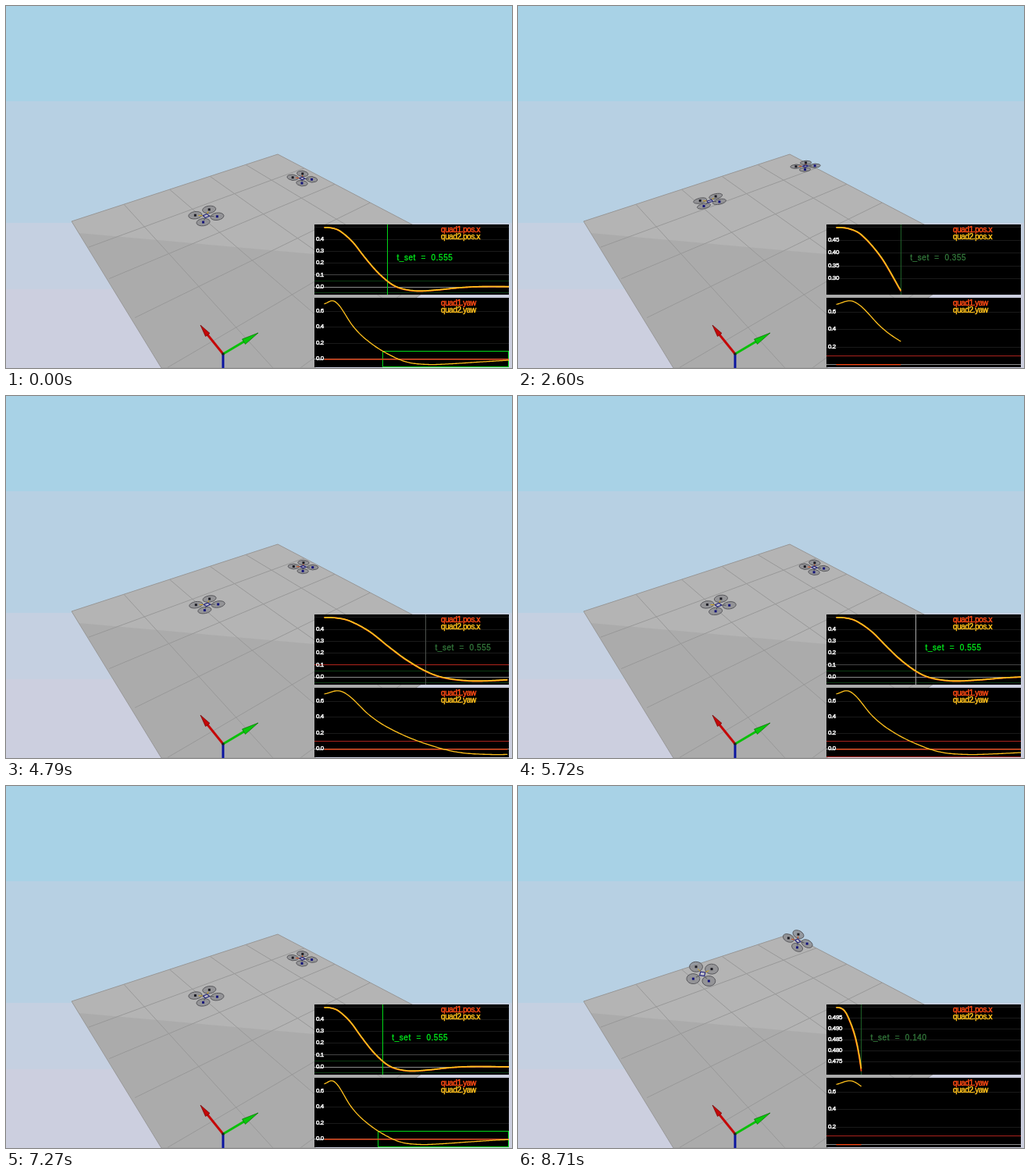
Write an HTML page with a canvas that moves like this. It is 648 by 464 pixels and loops after 8.81 s.

```html
<!DOCTYPE html>
<html lang="en">
<head>
<meta charset="utf-8">
<title>Quadrotor step response</title>
<style>
  html, body { margin: 0; width: 648px; height: 464px; overflow: hidden; }
  svg, canvas { position: absolute; left: 0; top: 0; display: block; }
</style>
</head>
<body>
<svg width="648" height="464" viewBox="0 0 648 464">
  <defs>
    <clipPath id="floorClip"><path id="floor" d="M84 276 348 190 600 322 395 464H199Z"/></clipPath>
  </defs>
  <path fill="#a8d2e6" d="M0 0H648V122H0Z"/>
  <path fill="#b7d0e3" d="M0 122H648V278H0Z"/>
  <path fill="#c5d0e1" d="M0 278H648V363H0Z"/>
  <path fill="#cccfdf" d="M0 363H648V464H0Z"/>
  <g clip-path="url(#floorClip)">
    <path fill="#ababab" d="M0 180H648V464H0Z"/>
    <path fill="#b4b4b4" d="M84 288 93 291 395 318 648 341V180H84Z"/>
    <path id="grid" fill="none" stroke="#989898" stroke-width="1"/>
  </g>
  <use href="#floor" fill="none" stroke="#989898"/>
  <g stroke-width="3" fill="none">
    <path stroke="#0a14a0" d="M278 446V464"/>
    <path stroke="#c40808" d="M278 446 257 420"/>
    <path stroke="#08c008" d="M278 446 305 430"/>
  </g>
  <path fill="#c40808" stroke="#700505" stroke-width=".7" d="M249 409 261 419.5 255.5 423.5Z"/>
  <path fill="#08c808" stroke="#067006" stroke-width=".7" d="M323 419 302.5 427 306.5 433.5Z"/>
  <circle cx="278" cy="446" r="1.8" fill="#222"/>
</svg>
<canvas id="view" width="648" height="464"></canvas>
<script>
const ctx = document.getElementById('view').getContext('2d');
const LOOP = 8810, STEP = 57.68, SETTLE = 0.555, YAW_SETTLE = 0.516;
const LEFT = 395, RIGHT = 644, X0 = 406.5, XSPAN = 236, YSPAN = 81.8;

// Perspective of the floor tiles
function project(u, v) {
  const d = 1 - 0.0529 * u - 0.0652 * v;
  return [(348 - 57.24 * u + 9.1 * v) / d, (190 + 2.6 * u + 4.24 * v) / d];
}
let tiles = '';
for (let k = 1; k <= 5; k++) {
  tiles += `M${project(0, k)}L${project(5, k)}`;
  if (k < 5) tiles += `M${project(k, 0)}L${project(k, 6)}`;
}
document.getElementById('grid').setAttribute('d', tiles);

// Smooth curve through [time, value] points, flat at both ends
function curve(pts) {
  const slope = i => {
    const a = pts[i - 1], b = pts[i + 1];
    return a && b ? (b[1] - a[1]) / (b[0] - a[0]) : 0;
  };
  return t => {
    let i = 0;
    while (i < pts.length - 2 && t > pts[i + 1][0]) i++;
    const [t0, a] = pts[i], [t1, b] = pts[i + 1], h = t1 - t0;
    const s = Math.min(1, Math.max(0, (t - t0) / h)), r = 1 - s;
    return r * r * (1 + 2 * s) * a + s * s * (3 - 2 * s) * b
      + h * s * r * (r * slope(i) - s * slope(i + 1));
  };
}
const posX = curve([[0, .5], [.07, .4955], [.14, .472], [.25, .382], [.355, .254], [.45, .145],
  [.555, .05], [.64, 0], [.75, -.027], [.85, -.033], [1, -.023], [1.2, -.004], [1.4, .004], [1.7, .002], [2.1, 0]]);
const yaw = curve([[0, .69], [.08, .73], [.14, .665], [.25, .425], [.355, .265], [.516, .1],
  [.712, -.03], [.9, -.065], [1.1, -.057], [1.4, -.03], [1.7, -.007], [2.1, 0]]);
const pitch = curve([[0, 0], [.05, .06], [.14, .33], [.355, -.2], [.58, -.38], [.71, -.35], [1, -.08], [1.27, 0], [2.1, 0]]);
const posX1 = t => posX(t) - 0.1 * t * t * Math.exp(-4 * t);

function simTime(ms) {
  const i = Math.min(151, Math.floor(ms / STEP + 0.1));
  if (i < 24) return 1.598 + 0.0168 * i;
  if (i < 45) return 0.025 + 0.0165 * (i - 25);
  if (i < 143) return 0.355 + 0.01695 * (i - 45);
  return 0.005 + 0.0169 * (i - 143);
}

function line(x1, y1, x2, y2, color, width = 1) {
  ctx.strokeStyle = color;
  ctx.lineWidth = width;
  ctx.beginPath();
  ctx.moveTo(x1, y1);
  ctx.lineTo(x2, y2);
  ctx.stroke();
}
const crisp = v => Math.floor(v) + 0.5;
const hline = (y, color) => line(LEFT, crisp(y), RIGHT, crisp(y), color);

function text(str, x, y, color, size, gap, outline) {
  ctx.font = `${size}px "Liberation Sans", Arial, sans-serif`;
  ctx.letterSpacing = gap + 'px';
  ctx.fillStyle = ctx.strokeStyle = color;
  ctx.lineWidth = outline;
  ctx.fillText(str, x, y);
  ctx.strokeText(str, x, y);
}

function drone(q, T, psi) {
  const f = 1 - posX(T) / 0.5;
  const cx = q.from[0] + (q.to[0] - q.from[0]) * f;
  const cy = q.from[1] + (q.to[1] - q.from[1]) * f - 600 * T ** 3 * Math.exp(-5 * T);
  const s = Math.sin(pitch(T)), c = Math.cos(pitch(T));
  const ex = [q.ex[0] * c, q.ex[1] * c - q.up * s], ey = q.ey;
  const at = (angle, r) => {
    const a = Math.cos(angle) * r, b = Math.sin(angle) * r;
    return [cx + a * ex[0] + b * ey[0], cy + a * ex[1] + b * ey[1]];
  };
  const rotors = [1, 3, 5, 7].map(k => at(psi + k * Math.PI / 4, Math.SQRT2));
  for (const [x, y] of rotors) {
    ctx.save();
    ctx.transform(ex[0], ex[1], ey[0], ey[1], x, y);
    ctx.beginPath();
    ctx.arc(0, 0, 0.83, 0, 2 * Math.PI);
    ctx.restore();
    ctx.fillStyle = 'rgba(140,140,144,.8)';
    ctx.fill();
    ctx.strokeStyle = '#58585c';
    ctx.lineWidth = 1;
    ctx.stroke();
  }
  rotors.forEach(([x, y], k) => {
    const front = k === 0 || k === 3;
    line(cx, cy, cx + (x - cx) * .7, cy + (y - cy) * .7, front ? q.color : '#55565c', 1);
    ctx.fillStyle = front ? '#1c1c24' : '#15157a';
    ctx.fillRect(x - 1.5, y - 1.5, 3, 3);
  });
  ctx.beginPath();
  for (let k = 1; k < 8; k += 2) ctx.lineTo(...at(psi + k * Math.PI / 4, 0.42));
  ctx.closePath();
  ctx.fillStyle = '#c4c4cc';
  ctx.fill();
  ctx.strokeStyle = '#26267c';
  ctx.lineWidth = 1.2;
  ctx.stroke();
}
const far = { from: [357, 198], to: [379.5, 222], ex: [-5.9, -3.6], ey: [6.3, -2.4], up: 8, color: '#d8541c' };
const near = { from: [235, 240], to: [256.5, 270], ex: [-5, -4.4], ey: [9, -3.6], up: 8.5, color: '#d0a51c' };

function tickStep(range) {
  for (let e = -4; ; e++)
    for (const m of [1, 2, 5]) {
      const step = m * 10 ** e;
      if (step > 0.0004 && range / step <= 7) return step;
    }
}

function chart(top, height, T, name, series, width, marks) {
  const bottom = top + height, kx = XSPAN / Math.max(1, T);
  let lo = Infinity, hi = -Infinity;
  const times = [];
  for (let t = 0; t < T; t += 0.01) times.push(t);
  times.push(T);
  for (const t of times)
    for (const s of series) {
      lo = Math.min(lo, s(t));
      hi = Math.max(hi, s(t));
    }
  const spare = Math.max(0, 0.001 - (hi - lo)) / 2;
  lo -= spare;
  hi += spare;
  const X = t => X0 + kx * t;
  const Y = v => top + 3.8 + (hi - v) / (hi - lo) * YSPAN;

  ctx.save();
  ctx.beginPath();
  ctx.rect(LEFT, top, RIGHT - LEFT, height);
  ctx.clip();
  ctx.fillStyle = '#000';
  ctx.fillRect(LEFT, top, RIGHT - LEFT, height);

  const step = tickStep(hi - lo), digits = Math.max(1, -Math.floor(Math.log10(step) + 1e-9));
  const ticks = [];
  for (let n = Math.ceil(lo / step - 1e-6); n * step <= hi + 1e-9; n++) ticks.push(n * step);
  for (const v of ticks) hline(Y(v), Math.abs(v) < 1e-9 ? '#8c8c8c' : '#1a1a1a');
  marks(X, Y);

  const colors = ['#ff4a14', '#ffc01c'];
  ctx.lineJoin = 'round';
  series.forEach((s, k) => {
    ctx.strokeStyle = colors[k];
    ctx.lineWidth = width;
    ctx.beginPath();
    for (const t of times) ctx.lineTo(X(t) + (t ? 0 : 1), Y(s(t)));
    ctx.lineTo(Math.min(X(T) + (T > 1 ? 2 : 0), RIGHT), Y(s(T)));
    ctx.stroke();
  });
  for (const v of ticks) {
    const y = Y(v);
    if (y > top + 8 && y < bottom - 5)
      text(Math.abs(v).toFixed(digits), 397, y + 1.7, '#fff', 8, -0.4, 0.5);
  }
  colors.forEach((c, k) => text(`quad${k + 1}.${name}`, 557, top + 9.6 + 9.5 * k, c, 10, -0.4, 0.5));
  ctx.restore();
}

function draw(ms) {
  const T = simTime(ms), settled = T >= 1, done = T >= 1.5;
  ctx.clearRect(0, 0, 648, 464);
  drone(far, T, 0);
  drone(near, T, yaw(T));

  chart(280, 90, T, 'pos.x', [posX1, posX], 1.7, (X, Y) => {
    const tSet = Math.min(SETTLE, T), x = X(tSet);
    hline(Y(0.1), settled ? '#464646' : '#b0241c');
    hline(Y(0.05), '#0b3a12');
    hline(Y(-0.05), '#0b3a12');
    const color = done ? '#00d818' : settled ? '#a8a8a8' : T > SETTLE ? '#4c504c' : '#1f6028';
    line(crisp(x), 280, crisp(x), 370, color);
    const value = (Math.round(tSet / 0.005) * 0.005).toFixed(3);
    text(`t_set\u00a0 =\u00a0 ${value}`, x + 12, 325.5, settled ? '#00f01c' : '#347a3c', 10, 0.55, 0.3);
  });

  chart(374, 89, T, 'yaw', [() => 0, yaw], 1.3, (X, Y) => {
    if (done) {
      const x = crisp(X(YAW_SETTLE)), y = crisp(Y(0.1));
      ctx.strokeStyle = '#00d818';
      ctx.lineWidth = 1;
      ctx.strokeRect(x, y, RIGHT - 0.5 - x, Math.min(462.5, crisp(Y(-0.1))) - y);
    } else {
      hline(Y(0.1), '#a8221c');
      hline(Math.min(Y(-0.1), T > 1 ? 462 : 999), '#a8221c');
    }
  });
}

const start = performance.now();
function tick() {
  draw((performance.now() - start) % LOOP);
  requestAnimationFrame(tick);
}
tick();
</script>
</body>
</html>
```
